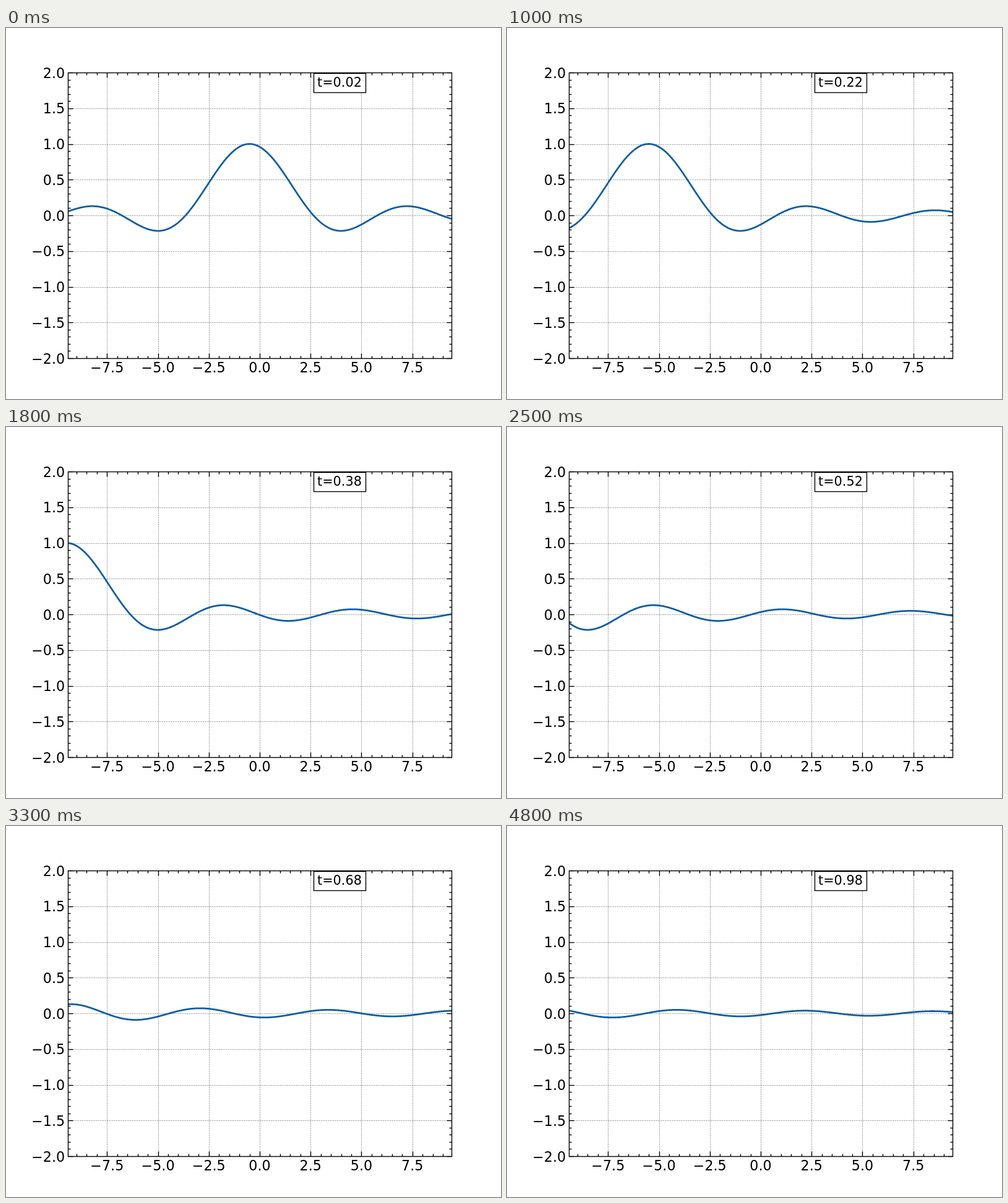
Recreate the animation shown at these times as an HTML page with a canvas. Size 800x600 px, loop 4900 ms.

```html
<!DOCTYPE html>
<html lang="en">
<head>
<meta charset="utf-8">
<title>Travelling sinc wave</title>
<style>
  html, body { margin: 0; width: 100%; height: 100%; overflow: hidden; background: #fff; }
  canvas { display: block; }
</style>
</head>
<body>
<canvas id="plot" width="800" height="600"></canvas>
<script>
const ctx = document.getElementById('plot').getContext('2d');
const L = 100, R = 720, T = 72, B = 534;
const X_MAX = 3 * Math.PI, Y_MAX = 2;
const PT = 100 / 72;
const STEP = 100, STEPS = 49, SPEED = 25;
const FONT = '"DejaVu Sans", Verdana, sans-serif';

const px = x => (L + R) / 2 + x * (R - L) / (2 * X_MAX);
const py = y => (T + B) / 2 - y * (B - T) / (2 * Y_MAX);
const snap = v => Math.floor(v + 0.5) + 0.5;
const sinc = u => Math.abs(u) < 1e-9 ? 1 : Math.sin(u) / u;
const label = v => v.toFixed(1).replace('-', '\u2212');

function line(x1, y1, x2, y2) {
  ctx.beginPath();
  ctx.moveTo(x1, y1);
  ctx.lineTo(x2, y2);
  ctx.stroke();
}

function pen(color, points, dash = []) {
  ctx.strokeStyle = color;
  ctx.lineWidth = points * PT;
  ctx.setLineDash(dash);
}

function text(str, x, y, points, align) {
  ctx.fillStyle = '#000';
  ctx.font = `${points * PT}px ${FONT}`;
  ctx.textAlign = align;
  ctx.fillText(str, x, y);
}

function drawGrid() {
  pen('rgba(0,0,0,0.5)', 0.5, [1.85 * PT, 0.8 * PT]);
  for (let i = -3; i <= 3; i++) {
    const x = snap(px(i * 2.5)), y = snap(py(i * 0.5));
    line(x, B + 0.5, x, T + 0.5);
    line(L + 0.5, y, R + 0.5, y);
  }
}

function drawTicks() {
  pen('#000', 1);
  for (let i = -18; i <= 18; i++) {
    const x = snap(px(i * 0.5)), len = i % 5 ? 4 : 8;
    line(x, B + 0.5, x, B + 0.5 - len);
    line(x, T + 0.5, x, T + 0.5 + len);
  }
  for (let i = -20; i <= 20; i++) {
    const y = snap(py(i * 0.1)), len = i % 5 ? 4 : 8;
    line(L + 0.5, y, L + 0.5 + len, y);
    line(R + 0.5, y, R + 0.5 - len, y);
  }
}

function drawLabels() {
  for (let i = -3; i <= 3; i++) text(label(i * 2.5), px(i * 2.5), 557, 16, 'center');
  for (let i = -4; i <= 4; i++) {
    text(label(i * 0.5), 95.1, Math.round(py(i * 0.5) + 8.5), 16, 'right');
  }
}

function drawCurve(t) {
  ctx.save();
  ctx.beginPath();
  ctx.rect(L, T, R - L, B - T);
  ctx.clip();
  pen('#0C5DA5', 2);
  ctx.lineJoin = 'round';
  ctx.lineCap = 'square';
  ctx.beginPath();
  for (let i = 0; i <= 1000; i++) {
    const x = X_MAX * (i / 500 - 1);
    ctx.lineTo(px(x), py(sinc(x + SPEED * t)));
  }
  ctx.stroke();
  ctx.restore();
}

function drawClock(t) {
  pen('#000', 1);
  ctx.fillStyle = '#fff';
  ctx.fillRect(497.5, 73.5, 84, 31);
  ctx.strokeRect(497.5, 73.5, 84, 31);
  text('t=' + t.toFixed(2), 503, 95, 15, 'left');
}

function draw(t) {
  ctx.fillStyle = '#fff';
  ctx.fillRect(0, 0, 800, 600);
  drawGrid();
  drawTicks();
  drawLabels();
  drawCurve(t);
  pen('#000', 1);
  ctx.strokeRect(L + 0.5, T + 0.5, R - L, B - T);
  drawClock(t);
}

const start = performance.now();
function tick() {
  const step = Math.floor(Math.max(0, performance.now() - start) / STEP) % STEPS;
  draw((step + 1) * 0.02);
  requestAnimationFrame(tick);
}
tick();
</script>
</body>
</html>
```
